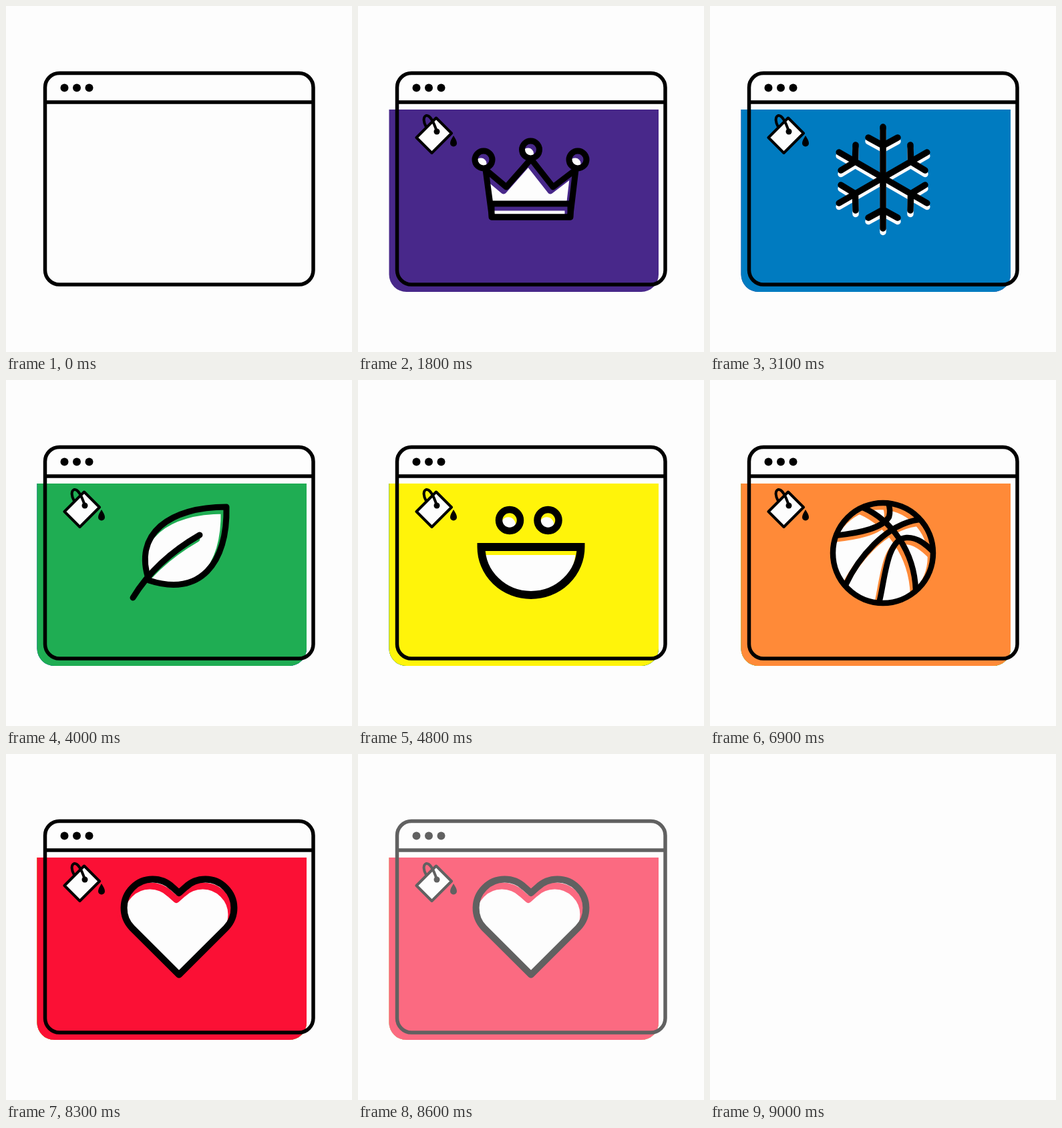
An HTML page for the animation above (9.4 s loop, 518 by 518 pixels).

```html
<!DOCTYPE html>
<html lang="en">
<head>
<meta charset="utf-8">
<title>Colour window</title>
<style>
html, body { margin: 0; width: 100%; height: 100%; overflow: hidden; background: #fdfdfd; }
svg { display: block; width: 100vw; height: 100vh; }
.all, .scene, .bucket { animation: 9400ms ease-in-out infinite; }
.all { animation-name: out; }
.scene { color: var(--c); }
.purple, .bucket { animation-name: in1; }
.blue { animation-name: in2; }
.green { animation-name: in3; }
.yellow { animation-name: in4; }
.orange { animation-name: in5; }
.red { animation-name: in6; }
.purple { --c: #48288a; }
.blue { --c: #007bc0; }
.green { --c: #1fad53; }
.yellow { --c: #fff40a; }
.orange { --c: #ff8a38; }
.red { --c: #fb1035; }

/* icon layers: white body, colour inset, black outline */
.body { fill: #fdfdfd; }
.inset { fill: none; stroke: currentColor; transform: translate(-4px, 6px); }
.line { fill: none; stroke: #000; }
.yellow .inset { transform: translate(-2px, 6px); }
.red .inset { transform: translate(-4px, 10px); }

@keyframes in1 { 0%, 4.79% { opacity: 0 } 9.04%, 100% { opacity: 1 } }
@keyframes in2 { 0%, 19.15% { opacity: 0 } 23.4%, 100% { opacity: 1 } }
@keyframes in3 { 0%, 32.98% { opacity: 0 } 37.23%, 100% { opacity: 1 } }
@keyframes in4 { 0%, 46.81% { opacity: 0 } 51.06%, 100% { opacity: 1 } }
@keyframes in5 { 0%, 60.64% { opacity: 0 } 64.89%, 100% { opacity: 1 } }
@keyframes in6 { 0%, 74.47% { opacity: 0 } 78.72%, 100% { opacity: 1 } }
@keyframes out { 0%, 88.3% { opacity: 1 } 95.74%, 100% { opacity: 0 } }
</style>
</head>
<body>
<svg viewBox="0 0 518 518">
  <defs>
    <path id="panel" d="M46.5 155H450V402a26 26 0 0 1-26 26H72.500a26 26 0 0 1-26-26Z" fill="currentColor"/>

    <g id="crown" stroke-width="9" stroke-linejoin="round">
      <path d="M191 245L200.500 316H317.500L326 245L292 271L259 229L222 271Z"/>
      <path d="M200 296H318V316H200Z"/>
      <circle cx="188" cy="230" r="13"/>
      <circle cx="258.500" cy="215" r="13"/>
      <circle cx="329" cy="230" r="13"/>
    </g>

    <path id="arm" d="M259 257V181M237 197L259 209L281 197"/>
    <g id="flake" stroke-width="9.500" stroke-linecap="round" stroke-linejoin="round">
      <use href="#arm"/>
      <use href="#arm" transform="rotate(60 259 257)"/>
      <use href="#arm" transform="rotate(120 259 257)"/>
      <use href="#arm" transform="rotate(180 259 257)"/>
      <use href="#arm" transform="rotate(240 259 257)"/>
      <use href="#arm" transform="rotate(300 259 257)"/>
    </g>

    <g id="leaf" stroke-width="9" stroke-linecap="round" stroke-linejoin="round">
      <path d="M214 300C190 230 245 190 330 190C332 275 290 325 214 300Z"/>
      <path d="M190 326C215 285 250 255 290 232" fill="none"/>
    </g>

    <g id="smile">
      <circle cx="227" cy="210" r="16" stroke-width="10.500"/>
      <circle cx="284.500" cy="210" r="16" stroke-width="10.500"/>
      <path d="M184.500 250H333.500A74.500 72 0 0 1 184.500 250Z" stroke-width="12"/>
    </g>

    <g id="ball" stroke-width="8.500">
      <circle cx="259" cy="259" r="75"/>
      <g fill="none">
        <path d="M187 233C225 229 258 222 268 205C270 198 269 190 267 184"/>
        <path d="M203 307C221 268 262 216 313 209"/>
        <path d="M229 191C270 209 306 255 308 315"/>
        <path d="M253 334C262 300 264 238 294 236C310 235 323 246 334 257"/>
      </g>
    </g>

    <path id="heart" stroke-width="10" stroke-linejoin="round"
      d="M259 330.500L188.600 260.400A43 43 0 0 1 249.400 199.600L259 208L268.600 199.600A43 43 0 0 1 329.400 260.400Z"/>
  </defs>

  <g class="all">
    <g class="scene purple">
      <use href="#panel"/>
      <use href="#crown" class="body"/>
      <use href="#crown" class="inset"/>
      <use href="#crown" class="line"/>
    </g>
    <g class="scene blue">
      <use href="#panel"/>
      <use href="#flake" fill="none" stroke="#fdfdfd" y="5.500"/>
      <use href="#flake" class="line"/>
    </g>
    <g class="scene green">
      <use href="#panel"/>
      <use href="#leaf" class="body"/>
      <use href="#leaf" class="inset"/>
      <use href="#leaf" class="line"/>
    </g>
    <g class="scene yellow">
      <use href="#panel"/>
      <use href="#smile" class="body"/>
      <use href="#smile" class="inset"/>
      <use href="#smile" class="line"/>
    </g>
    <g class="scene orange">
      <use href="#panel"/>
      <use href="#ball" class="body"/>
      <use href="#ball" class="inset"/>
      <use href="#ball" class="line"/>
    </g>
    <g class="scene red">
      <use href="#panel"/>
      <use href="#heart" class="body"/>
      <use href="#heart" class="inset"/>
      <use href="#heart" class="line"/>
    </g>

    <g class="bucket" stroke="#000" stroke-width="4" stroke-linejoin="round" stroke-linecap="round">
      <path d="M117 167.500L140 190.500L110.500 220L87.500 197Z" fill="#fdfdfd"/>
      <path d="M118 188C113 172 107 163 102 164C97 166 98 174 102 181" fill="none"/>
      <circle cx="118" cy="188" r="4.500" stroke="none"/>
      <path d="M143 194C146 199 148 202 148 205.500a5 5 0 0 1-10 0C138 202 140 199 143 194Z" stroke="none"/>
    </g>

    <g fill="none" stroke="#000" stroke-width="5.500">
      <rect x="58.500" y="100.500" width="401.500" height="316.500" rx="21.500"/>
      <path d="M58.500 144H460"/>
    </g>
    <circle cx="87.500" cy="122.500" r="6"/>
    <circle cx="106" cy="122.500" r="6"/>
    <circle cx="124.500" cy="122.500" r="6"/>
  </g>
</svg>
</body>
</html>
```
